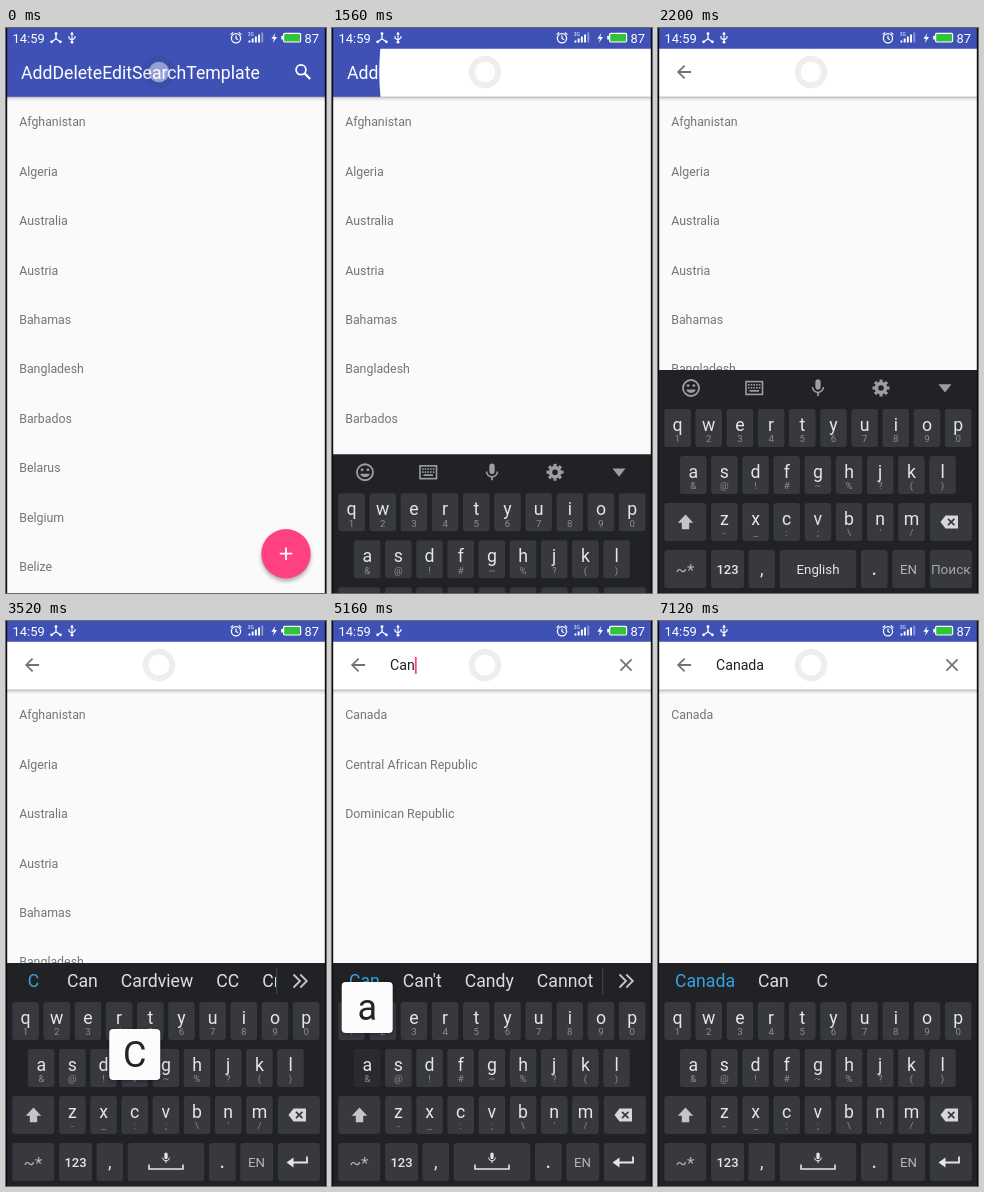
An HTML page for the animation above (7.6 s loop, 320 by 565 pixels).

```html
<!DOCTYPE html>
<html lang="en">
<head>
<meta charset="utf-8">
<title>Country search</title>
<style>
  html, body { margin: 0; width: 100%; height: 100%; overflow: hidden; background: #000; }
  svg { display: block; width: 320px; height: 565px; font-family: Roboto, "Noto Sans", sans-serif; }
  text { white-space: pre; }
</style>
</head>
<body>
<svg id="stage" viewBox="0 0 320 565" xmlns="http://www.w3.org/2000/svg"></svg>
<script>
const LOOP = 7600, STEP = 40, KB_TOP = 342, KB_HEIGHT = 223;
const SP = 0.8833;               // screen pixels per dp
const ACCENT = '#ff4081', BLUE = '#3f51b5', KEY = '#37393e', KEY_DOWN = '#292b2f';
const LIGHT = '#e4e5e7', DIM = '#8b8d91', HINT = '#35a3e0';

const countries = ['Afghanistan', 'Algeria', 'Australia', 'Austria', 'Bahamas', 'Bangladesh',
  'Barbados', 'Belarus', 'Belgium', 'Belize', 'Cambodia', 'Cameroon', 'Canada',
  'Central African Republic', 'Chad', 'Chile', 'Costa Rica', 'Dominican Republic'];

// Each key press: when it goes down, updates the strip, enters its text, and hides its popup.
const presses = [
  { ch: 'C', down: 3360, strip: 3520, text: 3560, up: 3600, words: ['C', 'Can', 'Cardview', 'CC', 'Create'] },
  { ch: 'a', down: 3840, strip: 3920, text: 3960, up: 4000, words: ['Ca', 'Can', 'Call', 'Cardview', 'Car'] },
  { ch: 'n', down: 4680, strip: 4760, text: 4760, up: 4800, words: ['Can', "Can't", 'Candy', 'Cannot'] },
  { ch: 'a', down: 5160, strip: 5240, text: 5280, up: 5320, words: ['Cana', 'Canada', 'Canal', 'Can'] },
  { ch: 'd', down: 5640, strip: 5720, text: 5760, up: 5800, words: ['Canad', 'Canada', 'Canadian'] },
  { ch: 'a', down: 6520, strip: 6600, text: 6640, up: 6680, words: ['Canada', 'Can', 'C'] }
];

const icons = {
  back: 'M20 11H7.83l5.59-5.59L12 4l-8 8 8 8 1.41-1.41L7.83 13H20z',
  close: 'M19 6.41L17.59 5 12 10.59 6.41 5 5 6.41 10.59 12 5 17.59 6.41 19 12 13.41 17.59 19 19 17.59 13.41 12z',
  mic: 'M12 14c1.66 0 3-1.34 3-3V5c0-1.66-1.34-3-3-3S9 3.34 9 5v6c0 1.66 1.34 3 3 3zm5.3-3c0 3-2.54 5.1-5.3 5.1S6.7 14 6.7 11H5c0 3.41 2.72 6.23 6 6.72V21h2v-3.28c3.28-.48 6-3.3 6-6.72z'
};

const esc = s => s.replace(/&/g, '&amp;').replace(/</g, '&lt;');
const label = (s, x, y, size, fill, more = '') =>
  `<text x="${x}" y="${y}" font-size="${size}" fill="${fill}" ${more}>${esc(s)}</text>`;
const mid = (s, x, y, size, fill, more = '') => label(s, x, y, size, fill, `text-anchor="middle" ${more}`);
const rect = (x, y, w, h, fill, more = '') =>
  `<rect x="${x}" y="${y}" width="${w}" height="${h}" fill="${fill}" ${more}/>`;
const circle = (x, y, r, more) => `<circle cx="${x}" cy="${y}" r="${r}" ${more}/>`;
const line = (d, color, w, more = '') =>
  `<path d="${d}" fill="none" stroke="${color}" stroke-width="${w}" ${more}/>`;
const shape = (d, fill, more = '') => `<path d="${d}" fill="${fill}" ${more}/>`;
const icon = (name, x, y, fill, scale = SP) =>
  shape(icons[name], fill, `transform="translate(${x} ${y}) scale(${scale}) translate(-12 -12)"`);

const pen = document.createElement('canvas').getContext('2d');
function textWidth(s, size) {
  pen.font = `${size}px Roboto, "Noto Sans", sans-serif`;
  return pen.measureText(s).width;
}

// ---- keyboard ----
const PITCH = 31.17, KEY_W = 26.6, KEY_H = 38;
const rows = [
  { keys: 'qwertyuiop', marks: '1234567890', x: 6.3, y: 381 },
  { keys: 'asdfghjkl', marks: '&@!#~%?()', x: 21.9, y: 428 },
  { keys: 'zxcvbnm', marks: "-_:;\\'/", x: 53.1, y: 475 }
];
const keyPos = {};

const keyBox = (x, y, w, id = '') => rect(x, y, w, KEY_H, KEY, `rx="3" ${id && `id="${id}"`}`);

function letterKeys() {
  let out = '';
  for (const row of rows) {
    [...row.keys].forEach((ch, i) => {
      const x = row.x + i * PITCH, cx = x + KEY_W / 2;
      keyPos[ch] = { x: cx, y: row.y };
      out += keyBox(x, row.y, KEY_W, 'key-' + ch) +
        mid(ch, cx, row.y + 22, 17.7, LIGHT, 'class="letter"') +
        mid(row.marks[i], cx, row.y + 33.3, 9.7, DIM);
    });
  }
  return out;
}

function specialKeys() {
  const y = 522;
  return keyBox(6.3, 475, 42, 'shiftKey') +
    shape('M27.5 486.5l7.7 8.2h-4v6.5h-7.4v-6.5h-4z', '#c4c5c8', 'id="shiftIcon"') +
    keyBox(271.9, 475, 42) +
    shape('M287.5 487.5h12.5v13h-12.5l-5-6.5z', '#d6d7d9') +
    line('M290 490.8l6.4 6.4m0-6.4l-6.4 6.4', KEY, 1.7) +
    keyBox(6.3, y, 42) + mid('~*', 27, 547.5, 17, '#b2b4b7') +
    keyBox(53.1, y, 33) + mid('123', 69.5, 545.7, 13, LIGHT, 'font-weight="500"') +
    keyBox(90.5, y, KEY_W) + mid(',', 103.8, 546.5, 17.7, LIGHT) +
    keyBox(121.7, y, 76.5) +
    keyBox(203, y, KEY_W) + mid('.', 216.3, 546.5, 17.7, LIGHT, 'font-weight="500"') +
    keyBox(234.2, y, 33) + mid('EN', 250.4, 545.7, 13.25, '#b2b4b7') +
    keyBox(271.9, y, 42) +
    `<g id="idleKeys">${mid('English', 160, 545.7, 13.25, LIGHT)}${mid('Поиск', 292.8, 545.7, 13.6, '#a4a6a9')}</g>
    <g id="typingKeys">${icon('mic', 160, 537, LIGHT, 0.55)}
      ${line('M143 543.5v4.5h34v-4.5', LIGHT, 1.6)}
      ${line('M301 535.5v6h-16', LIGHT, 1.8)}${shape('M287.5 536.5v10l-7-5z', LIGHT)}</g>`;
}

function toolIcons() {
  const c = '#9c9ea2';
  let dots = '';
  for (let r = 0; r < 2; r++)
    for (let i = 0; i < 5; i++) dots += rect(90 + i * 2.7, 356 + r * 3, 1.6, 1.6, c);
  return circle(33, 360, 8, `fill="none" stroke="${c}" stroke-width="1.8"`) +
    circle(30.1, 357.6, 1.4, `fill="${c}"`) + circle(35.9, 357.6, 1.4, `fill="${c}"`) +
    shape('M28.3 361.5h9.4a4.8 4.2 0 0 1-9.4 0z', c) +
    rect(88, 353.6, 16.5, 12.8, 'none', `stroke="${c}" stroke-width="1.6"`) + dots +
    rect(91.5, 362, 9.5, 1.7, c) +
    icon('mic', 160, 360, c) +
    circle(223, 360, 4.6, `fill="none" stroke="${c}" stroke-width="3.6"`) +
    circle(223, 360, 7.2, `fill="none" stroke="${c}" stroke-width="2.6" pathLength="80" stroke-dasharray="5.4 4.6" stroke-dashoffset="2.7"`) +
    shape('M280.5 356.2h13l-6.5 8.2z', c);
}

// ---- status bar ----
function statusBar() {
  const w = '#fff';
  let bars = '';
  for (let i = 0; i < 5; i++) {
    const h = 2 + i * 2;
    bars += rect(242.5 + i * 3.2, 14.5 - h, 1.9, h, w, i > 3 ? 'opacity=".4"' : '');
  }
  return rect(0, 0, 320, 20.5, BLUE) +
    label('14:59', 6.6, 14.6, 12.9, w) +
    line('M50 5.5v5.2m0 0l-4.2 3m4.2-3l4.2 3', w, 1.3) +
    circle(50, 5.6, 1.4, `fill="${w}"`) + circle(45.6, 13.8, 1.4, `fill="${w}"`) +
    circle(54.4, 13.8, 1.4, `fill="${w}"`) +
    line('M66 5v9M63 8v2.2l3 2 3-2.4V8', w, 1.1) + shape('M66 3.6l1.8 2.8h-3.6z', w) +
    circle(66, 14.2, 1.4, `fill="${w}"`) +
    circle(230, 10.2, 4.6, `fill="none" stroke="${w}" stroke-width="1.3"`) +
    line('M230 7.6v2.9l2 1.2M224.6 6.6l2.6-2.2M235.4 6.6l-2.6-2.2', w, 1.2) +
    bars + label('3G', 241.8, 8.2, 5, w) +
    shape('M269.4 5l-4 5.8h2.6l-1.2 4.2 4.2-6h-2.7z', w) +
    rect(277.6, 5.4, 17, 8.6, '#2fc43a', `rx="1.2" stroke="${w}" stroke-width="1.2"`) +
    rect(275.2, 7.9, 1.8, 3.6, w) +
    label('87', 298.6, 14.6, 12.9, w);
}

const stage = document.getElementById('stage');
stage.innerHTML = `
  <defs>
    <linearGradient id="shade" x2="0" y2="1">
      <stop offset="0" stop-color="#000" stop-opacity=".32"/>
      <stop offset=".4" stop-color="#000" stop-opacity=".1"/>
      <stop offset="1" stop-color="#000" stop-opacity="0"/>
    </linearGradient>
    <filter id="soft" x="-30%" y="-30%" width="160%" height="160%"><feGaussianBlur stdDeviation="2"/></filter>
    <clipPath id="listClip"><rect id="listArea" y="68" width="320" height="497"/></clipPath>
    <clipPath id="revealClip"><circle id="reveal" cx="297" cy="44" r="0"/></clipPath>
    <clipPath id="stripClip"><rect id="stripArea" y="342" width="270" height="38"/></clipPath>
  </defs>
  ${rect(0, 0, 320, 565, '#fafafa')}
  <g id="list" clip-path="url(#listClip)"></g>
  <g id="fab">
    ${circle(0, 3, 24.5, 'fill="#000" opacity=".32" filter="url(#soft)"')}
    ${circle(0, 0, 24.7, `fill="${ACCENT}"`)}
    ${line('M-6.2 0h12.4M0-6.2v12.4', '#fff', 1.8)}
  </g>
  ${rect(0, 68.5, 320, 5, 'url(#shade)')}
  ${rect(0, 20, 320, 48.8, BLUE)}
  ${label('AddDeleteEditSearchTemplate', 15, 51, 17.67, '#fff')}
  ${circle(295, 41.8, 4.9, 'fill="none" stroke="#fff" stroke-width="1.8"')}
  ${line('M298.6 45.4l5.6 5.6', '#fff', 2.2)}
  <g clip-path="url(#revealClip)">
    ${rect(0, 20.5, 320, 48.3, '#fff')}
    ${icon('back', 26, 44, '#737373')}
    <g id="clear">${icon('close', 294, 44, '#737373')}</g>
    ${label('', 58, 49, 14.13, '#212121', 'id="query"')}
    ${rect(58, 36, 1.8, 17, ACCENT, 'id="caret"')}
  </g>
  ${statusBar()}
  <g id="keyboard">
    ${rect(0, KB_TOP, 320, KB_HEIGHT + 2, '#202226')}
    <g id="tools">${toolIcons()}</g>
    <g id="strip" clip-path="url(#stripClip)"></g>
    <g id="more">${rect(270.3, 347, 1, 26, '#44464a')}
      ${line('M287.5 353.5l6.5 6.5-6.5 6.5m6.8-13l6.5 6.5-6.5 6.5', '#c4c5c8', 1.8)}</g>
    ${letterKeys()}${specialKeys()}
    <g id="popup">
      ${rect(-25.5, 1, 51, 51, '#000', 'rx="4" opacity=".35" filter="url(#soft)"')}
      ${rect(-25.5, 0, 51, 51, '#fcfcfc', 'rx="4"')}
      ${mid('', 0, 38, 36, '#222428', 'id="popupText"')}
    </g>
  </g>
  ${rect(0, 0, 1.2, 565, '#0b0b10')}${rect(318.8, 0, 1.2, 565, '#0b0b10')}
  ${circle(153, 44, 13.3, 'fill="none" stroke="#000" stroke-opacity=".065" stroke-width="6"')}
  ${circle(153, 44, 10.3, 'fill="#fff" fill-opacity=".45"')}`;

const el = {};
stage.querySelectorAll('[id]').forEach(n => el[n.id] = n);
const letters = [...stage.querySelectorAll('.letter')];
const show = (n, on) => n.setAttribute('display', on ? 'inline' : 'none');
const set = (n, name, v) => n.setAttribute(name, v);
const clamp = v => Math.max(0, Math.min(1, v));
const part = (t, from, length) => clamp((t - from) / length);

function drawList(query) {
  const found = countries.filter(c => c.toLowerCase().includes(query.toLowerCase()));
  el.list.innerHTML = found.slice(0, 10)
    .map((c, i) => label(c, 13.2, 98.2 + i * 49.45, 12.37, '#757575')).join('');
}

function drawStrip(words) {
  let x = 5.5;
  el.strip.innerHTML = words.map((word, i) => {
    const cell = Math.max(44, textWidth(word, 17.67) + 23);
    x += cell;
    return mid(word, x - cell / 2, 366, 17.67, i ? '#dcdde0' : HINT);
  }).join('');
}

function caretOn(t, typed) {
  if (typed) return Math.floor((t - typed.text) / 480) % 2 === 0;
  return [1720, 2200, 2680, 3200].filter(mark => t >= mark).length % 2 === 1;
}

let lastQuery = null, lastWords = null;

function draw(t) {
  const typed = presses.filter(p => t >= p.text);
  const query = typed.map(p => p.ch).join('');
  const hinted = presses.filter(p => t >= p.strip).pop();
  const held = presses.find(p => t >= p.down && t < p.up);

  // search bar
  const grow = part(t, 1352, 300);
  set(el.reveal, 'r', 318 * (0.5 - Math.cos(grow * Math.PI) / 2) * (t >= 1360));
  if (query !== lastQuery) {
    drawList(query);
    el.query.textContent = lastQuery = query;
    set(el.caret, 'x', 58.2 + textWidth(query, 14.13));
  }
  show(el.clear, query);
  show(el.caret, caretOn(t, typed[typed.length - 1]));

  // keyboard slide, layout resize, floating button
  const slide = KB_HEIGHT * (1 - part(t, 1455, 379)) ** 3;
  set(el.keyboard, 'transform', `translate(0 ${slide})`);
  show(el.keyboard, t > 1455);
  const resized = t >= 1680;
  set(el.listArea, 'height', (resized ? KB_TOP : 565) - 68);
  const size = 1 - part(t, 1720, 200) ** 2;
  set(el.fab, 'transform', `translate(280 ${resized ? 302.7 : 525.7}) scale(${size})`);
  set(el.fab, 'opacity', size);

  // keys
  const caps = t >= 2880 && t < 3480;
  letters.forEach(n => {
    const s = n.textContent;
    n.textContent = caps ? s.toUpperCase() : s.toLowerCase();
  });
  set(el.shiftKey, 'fill', t >= 2800 && t < 2880 ? KEY_DOWN : KEY);
  set(el.shiftIcon, 'fill', caps ? HINT : '#c4c5c8');
  for (const ch in keyPos) {
    const down = held && held.ch.toLowerCase() === ch && t < Math.min(held.strip, 3480 > held.down ? 3480 : LOOP);
    set(el['key-' + ch], 'fill', down ? KEY_DOWN : KEY);
  }
  show(el.popup, held);
  if (held) {
    const p = keyPos[held.ch.toLowerCase()];
    set(el.popup, 'transform', `translate(${p.x} ${p.y - 67})`);
    el.popupText.textContent = held.ch;
  }

  // suggestions
  show(el.tools, !hinted);
  show(el.strip, hinted);
  show(el.more, hinted && hinted.words.length > 2 && hinted !== presses[5]);
  show(el.idleKeys, !hinted);
  show(el.typingKeys, hinted);
  if (hinted && hinted.words !== lastWords) drawStrip(lastWords = hinted.words);
}

const start = performance.now();
function tick() {
  const t = (performance.now() - start) % LOOP;
  draw(Math.floor(t / STEP) * STEP);
  requestAnimationFrame(tick);
}
tick();
</script>
</body>
</html>
```
